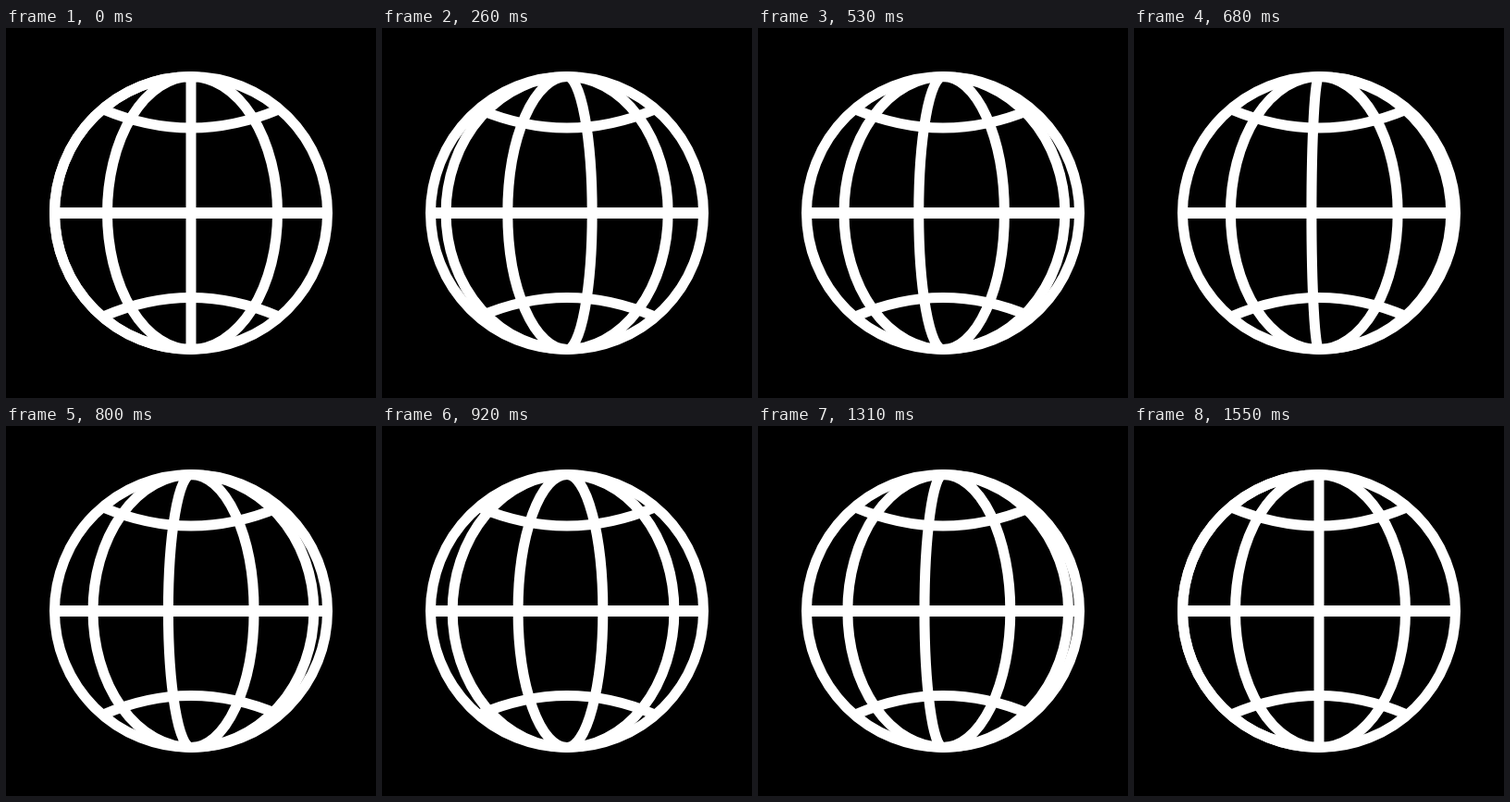
Animation of 400x400 px, one loop 1640 ms. Source, as an HTML page:

```html
<!DOCTYPE html>
<html lang="en">
<head>
<meta charset="utf-8">
<title>Spinning globe</title>
<style>
  html, body { margin: 0; width: 100%; height: 100%; overflow: hidden; background: #000; }
  svg { display: block; width: 100%; height: 100%; }
</style>
</head>
<body>
<svg viewBox="0 0 400 400" fill="none" stroke="#fff" stroke-width="11">
  <circle cx="200" cy="200" r="147.5"/>
  <path d="M52 200H348" stroke-width="12"/>
  <path d="M105 88Q200 128 295 88M105 312Q200 271 295 312"/>
  <path id="meridians"/>
</svg>
<script>
const LOOP = 1640, START = 200, STEP = 30, STEPS = 45, TURNS = 7;
const stops = [-147.5, -90.5, 0, 93.5, 147.5]; // resting offsets from the axis
const meridians = document.getElementById('meridians');

// Cubic bezier easing with control points (.092, 0) and (.416, 1)
function ease(x) {
  let lo = 0, hi = 1;
  for (let i = 0; i < 24; i++) {
    const u = (lo + hi) / 2, v = 1 - u;
    if (3 * v * v * u * 0.092 + 3 * v * u * u * 0.416 + u ** 3 < x) lo = u;
    else hi = u;
  }
  return hi * hi * (3 - 2 * hi);
}

function halfEllipse(dx) {
  return `M200 52.5A${Math.abs(dx)} 147.5 0 0 ${dx > 0 ? 1 : 0} 200 347.5`;
}

function draw(now) {
  const step = Math.floor((now % LOOP - START) / STEP);
  const k = Math.min(STEPS, Math.max(0, step));
  const phase = k % STEPS ? ease(k / STEPS) * TURNS % 1 : 0;
  meridians.setAttribute('d', stops.slice(0, -1)
    .map((from, i) => halfEllipse(from + (stops[i + 1] - from) * phase))
    .join(''));
  requestAnimationFrame(draw);
}
draw(0);
</script>
</body>
</html>
```
